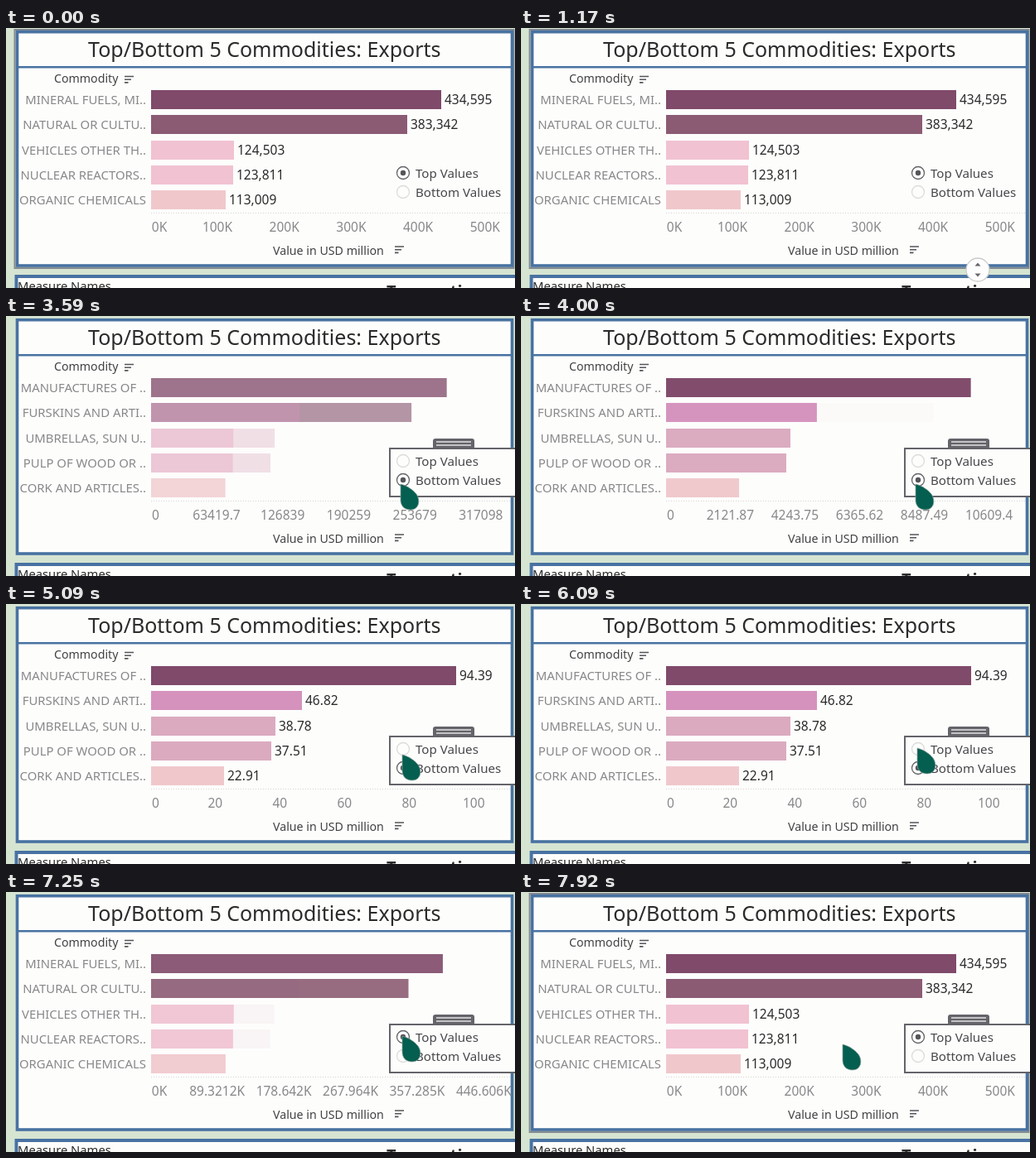
An HTML page that plays this animation: 614x314 px, repeating every 8 s.

```html
<!DOCTYPE html>
<html lang="en">
<head>
<meta charset="utf-8">
<title>Commodity exports</title>
<style>
  html, body { margin: 0; width: 100%; height: 100%; overflow: hidden; background: #d6e4d2; }
  svg { display: block; width: 614px; height: 314px; font-family: "Noto Sans", "Open Sans", sans-serif; }
  .title { font-size: 25px; fill: #2b2b2b; }
  .head { font-size: 14.2px; font-weight: 500; fill: #424244; }
  .name { font-size: 14.9px; fill: #88888a; text-anchor: end; }
  .value { font-size: 15.5px; fill: #2b2b2b; }
  .tick { font-size: 15.5px; fill: #88888a; text-anchor: middle; }
  .option { font-size: 15.1px; fill: #47474b; }
  .icon { stroke: #55555a; stroke-width: 1.6; fill: none; }
</style>
</head>
<body>
<svg id="stage" viewBox="0 0 614 314">
  <rect width="614" height="314" fill="#d6e4d2"/>
  <rect id="outline" x="10.5" y="2" width="602" height="288" fill="none" stroke="#858b90" stroke-width="2"/>
  <rect x="13.5" y="4.7" width="597" height="282.3" fill="#fdfdfc" stroke="#4872a2" stroke-width="3.6"/>
  <path d="M12 47.2H612" stroke="#4872a2" stroke-width="2.4"/>
  <text class="title" x="99" y="35">Top/Bottom 5 Commodities: Exports</text>
  <text class="head" x="58" y="66">Commodity</text>
  <path class="icon" d="M143 58.5h11M143 62.2h8M143 65.9h4.5"/>
  <rect x="12.5" y="300" width="640" height="60" fill="#fdfdfc" stroke="#4872a2" stroke-width="4"/>
  <text x="14" y="317" font-size="14.75" fill="#2b2b2b">Measure Names</text>
  <text x="459" y="325" font-size="20" font-weight="700" fill="#2b2b2b">Transactions</text>
  <path d="M175 223.5H609" stroke="#d4d4d4" stroke-dasharray="1 2"/>
  <g id="chart"></g>
  <text class="head" x="322" y="274">Value in USD million</text>
  <path class="icon" d="M469 264h11M469 267.7h8M469 271.4h4.5"/>
  <rect id="frame" x="463" y="160" width="170" height="58" fill="#fdfdfc" stroke-width="2"/>
  <g id="handle">
    <path d="M515 159v-8q0-3 3-3h44q3 0 3 3v8z" fill="#64646a"/>
    <path d="M519 152h42M519 156h42" stroke="#e2e2e4" stroke-width="1.3"/>
  </g>
  <g id="radios"></g>
  <g id="resizer">
    <circle r="14" fill="#fefefe" stroke="#cbcbcb" stroke-width="1.3"/>
    <path d="M-3.5-4.5L0-8.5 3.5-4.5zM-3.5 4.5L0 8.5 3.5 4.5z" fill="#66666a"/>
  </g>
  <path id="drop" d="M0 0C8 2 15 7 19 12C24.5 20 22 31 12 31C4 31 0 26 0 19Z"
        fill="#045f50" stroke="#8fa39a" stroke-width=".7"/>
</svg>
<script>
const LOOP = 8000, LEFT = 175;
const CLICK = 3340, TO_BOTTOM = 3436, TO_TOP = 6794, SWITCH_TIME = 650;
const ROW_Y = [75, 105, 136, 166, 196];

// ends: right edge of each bar on the small axis and on the large axis
const SETS = {
  top: {
    names: ["MINERAL FUELS, MI..", "NATURAL OR CULTU..", "VEHICLES OTHER TH..", "NUCLEAR REACTORS..", "ORGANIC CHEMICALS"],
    values: ["434,595", "383,342", "124,503", "123,811", "113,009"],
    colors: ["#804a6a", "#8b5b73", "#f1c2d2", "#f1c2d2", "#f0c8cc"],
    ends: [[543, 525], [498, 484], [273, 275], [273, 274], [264, 265]]
  },
  bottom: {
    names: ["MANUFACTURES OF ..", "FURSKINS AND ARTI..", "UMBRELLAS, SUN U..", "PULP OF WOOD OR ..", "CORK AND ARTICLES.."],
    values: ["94.39", "46.82", "38.78", "37.51", "22.91"],
    colors: ["#804a6a", "#d592bd", "#dbaabf", "#dbaabf", "#f0c8cc"],
    ends: [[543, 525], [357, 352.5], [325, 323.5], [320, 318.5], [263, 265]]
  }
};

const $ = id => document.getElementById(id);
const clamp = x => Math.min(1, Math.max(0, x));
const mix = (a, b, k) => a + (b - a) * k;
const smooth = k => k * k * (3 - 2 * k);
const span = (t, from, to) => clamp((t - from) / (to - from));
const show = (id, on) => $(id).setAttribute("visibility", on ? "visible" : "hidden");
const place = (id, [x, y]) => $(id).setAttribute("transform", `translate(${x.toFixed(2)} ${y.toFixed(2)})`);
const text = (cls, x, y, s) => `<text class="${cls}" x="${x}" y="${y}">${s}</text>`;

// keys: [time, x, y], eased between neighbours
function along(keys, t) {
  let i = 0;
  while (i < keys.length - 2 && t >= keys[i + 1][0]) i++;
  const [a, b] = [keys[i], keys[i + 1]];
  const k = smooth(span(t, a[0], b[0]));
  return [mix(a[1], b[1], k), mix(a[2], b[2], k)];
}

const DROP_PATH = [[1880, 551, 290], [2110, 476, 203], [4460, 476, 203], [5090, 478, 182],
                   [5630, 478, 174], [7440, 478, 174], [7920, 388, 184]];
const RESIZER_PATH = [[1000, 551, 330], [1170, 551, 292], [1710, 551, 292]];

// 1 = large axis with the top set, 0 = small axis with the bottom set
function progress(t) {
  const ease = start => Math.sin(span(t, start, start + SWITCH_TIME) * Math.PI / 2);
  return t < TO_TOP ? 1 - ease(TO_BOTTOM) : ease(TO_TOP);
}

function bars(set, p, opacity) {
  if (opacity <= 0) return "";
  return set.ends.map(([small, large], i) =>
    `<rect x="${LEFT}" y="${ROW_Y[i]}" width="${mix(small, large, p) - LEFT}" height="23"
      fill="${set.colors[i]}" opacity="${opacity}"/>`).join("");
}

function axis(p, thousands) {
  const step = mix(100, 500000, p) / 5, gap = mix(78, 80.7, p);
  let out = text("tick", thousands ? 185 : 180.5, 246, thousands ? "0K" : "0");
  for (let i = 1; i <= 5; i++) {
    const n = step * i / (thousands ? 1000 : 1);
    out += text("tick", 174.3 + gap * i, 246, +n.toPrecision(6) + (thousands ? "K" : ""));
  }
  return out;
}

function drawChart(t) {
  const toBottom = t >= TO_BOTTOM && t < TO_TOP;
  const p = progress(t);
  const settled = p === (toBottom ? 0 : 1);
  const set = toBottom ? SETS.bottom : SETS.top;
  let out = toBottom
    ? bars(SETS.top, p, p) + bars(SETS.bottom, p, 1 - p)
    : bars(SETS.bottom, p, 1 - p) + bars(SETS.top, p, p);
  set.names.forEach((name, i) => {
    out += text("name", 169, ROW_Y[i] + 17, name);
    if (settled) out += text("value", set.ends[i][p] + 4, ROW_Y[i] + 17, set.values[i]);
  });
  $("chart").innerHTML = out + axis(p, !toBottom);
}

function radio(y, label, on) {
  return `<circle cx="479" cy="${y}" r="7.5" fill="#fdfdfc" stroke="${on ? "#636368" : "#dcdcdc"}" stroke-width="1.3"/>` +
    (on ? `<circle cx="479" cy="${y}" r="3.2" fill="#55555a"/>` : "") +
    text("option", 494, y + 6, label);
}

function draw(t) {
  const clicked = t >= CLICK, bottomOn = clicked && t < TO_TOP;
  drawChart(t);
  $("radios").innerHTML = radio(175, "Top Values", !bottomOn) + radio(198, "Bottom Values", bottomOn);
  show("outline", !clicked || t >= 7630);
  show("frame", t >= 2080);
  $("frame").setAttribute("stroke", clicked ? "#64646a" : "#c6c6c8");
  show("handle", clicked);
  show("resizer", t >= 1000 && t < 1880);
  place("resizer", along(RESIZER_PATH, t));
  show("drop", t >= 1880);
  place("drop", along(DROP_PATH, t));
}

const begin = performance.now();
function tick() {
  draw((performance.now() - begin) % LOOP);
  requestAnimationFrame(tick);
}
tick();
</script>
</body>
</html>
```
